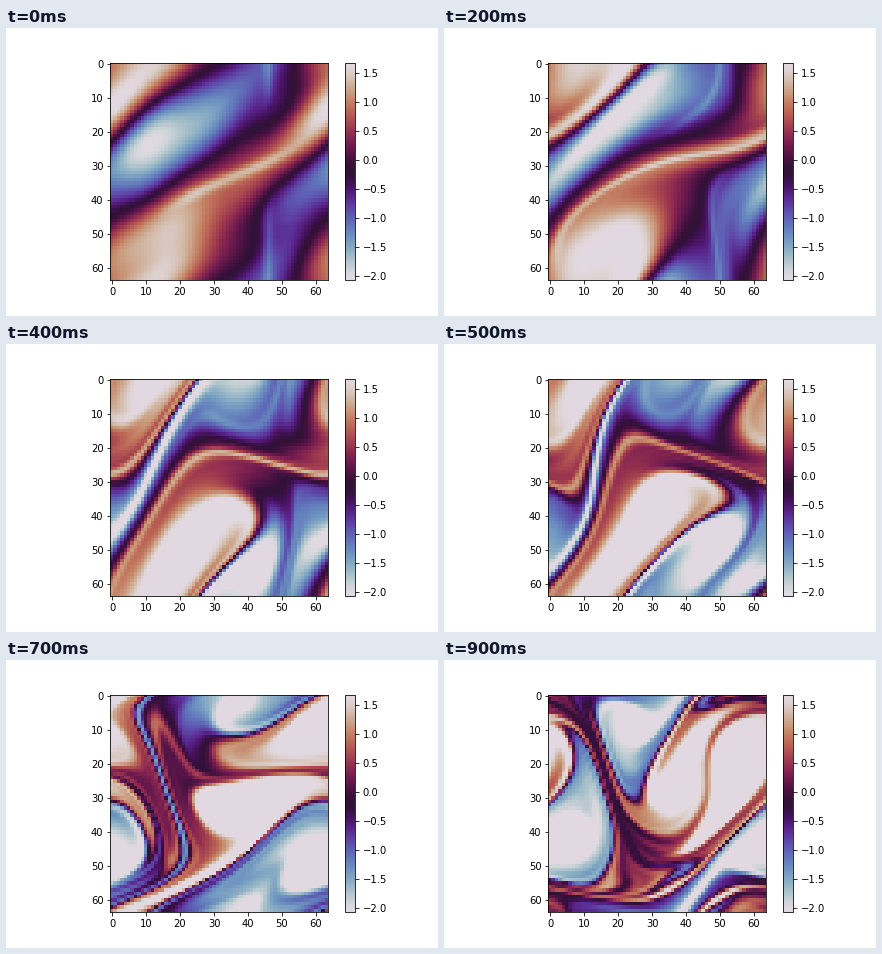
Recreate the animation shown at these times as a matplotlib script. Size 432 by 288 pixels, loop 1 s.

```python
import numpy as np
import matplotlib.pyplot as plt
from matplotlib.animation import FuncAnimation

CELLS, N, FRAMES = 64, 128, 10
FRAME_TIME, SUBSTEPS = 1.2, 48
VISCOSITY = 1.5e-5

# Starting vorticity: waves as (down, across, amplitude, phase in degrees).
WAVES = [
    (1, 1, 1.14, -42), (1, 0, .52, 50), (2, 1, .32, -175),
    (0, 1, .20, -41), (1, 2, .16, -62), (2, 2, .14, 177),
    (0, 2, .11, 10), (3, 2, .11, 102), (1, -1, .09, 125),
    (3, 3, .09, 113), (0, 3, .08, 35), (2, 3, .07, -163),
]

kx = np.fft.fftfreq(N, 1 / N)[:, None]
ky = np.fft.rfftfreq(N, 1 / N)[None, :]
k2 = kx**2 + ky**2
laplace = 4 * np.pi**2 * k2
inverse = 1 / np.where(laplace == 0, 1, laplace)
dx, dy = 2j * np.pi * kx, 2j * np.pi * ky
cutoff = (N / 3)**2
keep = k2 < cutoff
soften = np.exp(-.3 * (k2 / cutoff)**4)

x, y = np.meshgrid(np.arange(N) / N, np.arange(N) / N, indexing="ij")
forcing = np.fft.rfft2(.09 * np.sqrt(2) * np.cos(2 * np.pi * (x + y) - np.pi / 4))


def to_grid(h):
    return np.fft.irfft2(h, s=(N, N))


def bump(t, power=2):
    return np.exp(-np.abs(t)**power)


def initial_vorticity():
    w = sum(amp * np.cos(2 * np.pi * (p * x + q * y) + np.radians(phase))
            for p, q, amp, phase in WAVES)
    row, col = x * CELLS, y * CELLS

    # Bright ridge climbing to the right.
    d = col - 36
    ridge = 33 - .4 * d - 2.2e-4 * d**3
    w += .65 * bump(d / 18, 4) * bump((row - ridge) / 2)

    # Thin negative filament, bending at both ends.
    r = (row + 32) % CELLS - 32
    filament = (46 - .06 * np.maximum(r - 8, 0)**2
                + .06 * np.maximum(-21 - r, 0)**2)
    w -= .4 * bump((r + 6) / 17, 4) * bump((col - filament) / 1.6)

    h = np.fft.rfft2(w) * keep
    h[0, 0] = 0
    return h


def rate(h):
    psi = h * inverse
    advection = (to_grid(dy * psi) * to_grid(dx * h)
                 - to_grid(dx * psi) * to_grid(dy * h))
    return forcing - keep * np.fft.rfft2(advection) - VISCOSITY * laplace * h


def advance(h):
    """Flow during one frame, in classic Runge-Kutta steps."""
    dt = FRAME_TIME / SUBSTEPS
    for _ in range(SUBSTEPS):
        a = rate(h)
        b = rate(h + dt / 2 * a)
        c = rate(h + dt / 2 * b)
        d = rate(h + dt * c)
        h = soften * (h + dt / 6 * (a + 2 * b + 2 * c + d))
    return h


def simulate():
    h = initial_vorticity()
    fields = []
    for i in range(FRAMES):
        if i:
            h = advance(h)
        fields.append(to_grid(h)[::N // CELLS, ::N // CELLS])
    return fields


fields = simulate()

fig, ax = plt.subplots(figsize=(6, 4), dpi=72)
fig.subplots_adjust(left=.125, right=.9, bottom=.125, top=.88)
image = ax.imshow(fields[0], cmap="twilight", vmin=-2.07, vmax=1.677)
fig.colorbar(image)


def draw(i):
    image.set_data(fields[i])
    return [image]


anim = FuncAnimation(fig, draw, frames=FRAMES, init_func=lambda: draw(0),
                     interval=100, repeat=True)
plt.show()
```
